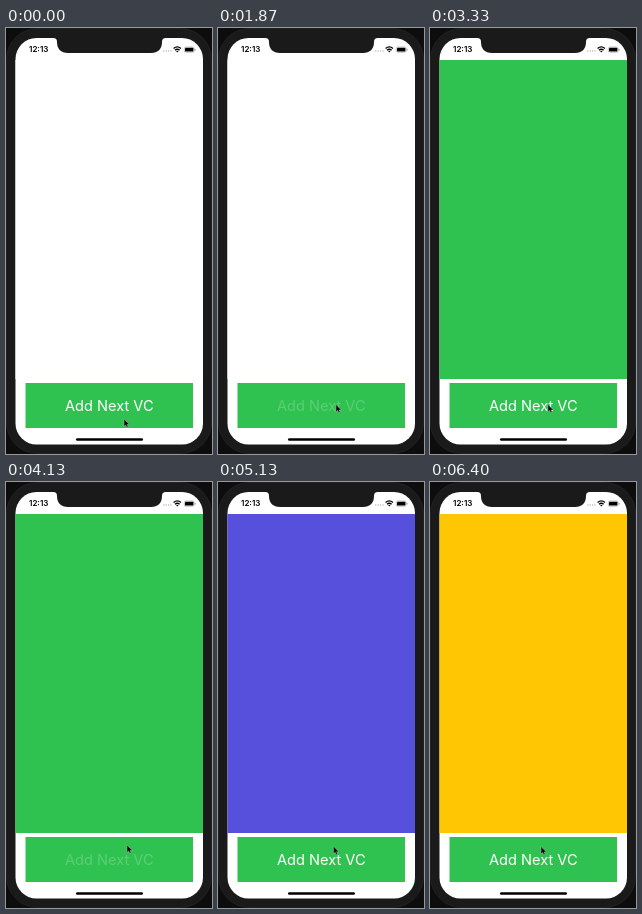
Recreate the animation shown at these times as an HTML page. Size 206 by 426 pixels, loop 7.67 s.

```html
<!DOCTYPE html>
<html lang="en">
<head>
<meta charset="utf-8">
<title>Add Next VC</title>
<style>
  html, body { margin: 0; width: 100%; height: 100%; overflow: hidden; background: #0d0d0e; }
  svg { display: block; width: 100%; height: 100%; }
  text { font-family: Inter, "Liberation Sans", sans-serif; }
</style>
</head>
<body>
<svg viewBox="0 0 206 426">
  <rect x="0.5" y="0.5" width="205" height="425" rx="31" fill="#1a1a1b" stroke="#272728" stroke-width="0.7"/>
  <rect x="9.5" y="10" width="187.5" height="406.5" rx="21" fill="#fff"/>
  <path d="M47 9.5V10C50 10 51 11.500 51 14C51 21 55 25 62 25H145C152 25 156 21 156 14C156 11.500 157 10 160 10V9.500Z" fill="#1a1a1b"/>

  <text x="23" y="24.300" font-size="8" font-weight="600">12:13</text>
  <g fill="#b5b5b5">
    <circle cx="157.800" cy="23" r="0.700"/><circle cx="160.200" cy="23" r="0.700"/>
    <circle cx="162.600" cy="23" r="0.700"/><circle cx="165" cy="23" r="0.700"/>
  </g>
  <g fill="none" stroke="#000" stroke-width="1.300">
    <path d="M167.600 20.500Q171.300 17.200 175 20.500M169 22.200Q171.300 20.200 173.600 22.200"/>
    <path d="M171.300 24.600L170.100 23.300Q171.300 22.400 172.500 23.300Z" fill="#000" stroke="none"/>
  </g>
  <rect x="178.300" y="19" width="9.800" height="5.300" rx="1.500" fill="none" stroke="#888" stroke-width="0.500"/>
  <rect x="179" y="19.700" width="8.400" height="3.900" rx="0.900"/>
  <rect x="188.700" y="20.700" width="0.800" height="2" rx="0.400" fill="#888"/>

  <rect id="panel" x="9.500" y="32" width="187.500" height="319"/>
  <rect x="19.500" y="355" width="167.500" height="45" fill="#30c250"/>
  <text id="label" x="103.300" y="383.300" font-size="14.600" text-anchor="middle" fill="#fff">Add Next VC</text>
  <rect x="70" y="410.300" width="67" height="2.400" rx="1.200"/>
  <path id="cursor" d="M0 0V7.500L1.700 6L2.800 8.300L4.100 7.700L3.100 5.500H5.300Z" fill="#0a0a0a" stroke="#bbb" stroke-width="0.450"/>
</svg>
<script>
const LOOP = 7670;
const DIM = 0.2;
const [panel, label, cursor] = ["panel", "label", "cursor"].map(id => document.getElementById(id));

// Each tap: finger down, new panel shown, label restored.
const taps = [
  { down: 1870, show: 1930, end: 2470, color: "#30c250" },
  { down: 4130, show: 4270, end: 4730, color: "#5650dc" },
  { down: 5870, show: 5930, end: 6400, color: "#ffc604" }
];

// Pointer tip: time, x, y
const path = [
  [0, 118, 391], [530, 123, 424], [740, 123, 424],
  [1200, 118, 388], [1530, 118, 376.5], [3300, 118, 376.5],
  [4000, 121, 363], [4800, 121, 363], [5130, 115.5, 364.3],
  [5330, 111.5, 364.5], [5470, 111, 364.5], [LOOP, 111, 364.5]
];

const clamp = v => Math.max(0, Math.min(1, v));
const mix = (a, b, k) => a + (b - a) * k;
const smooth = k => k * k * (3 - 2 * k);

function pointerAt(t) {
  const i = path.findIndex(p => p[0] > t);
  const [a, b] = [path[i - 1], path[i]];
  const k = smooth((t - a[0]) / (b[0] - a[0]));
  return [mix(a[1], b[1], k), mix(a[2], b[2], k)];
}

function render(t) {
  let color = "#fff", alpha = 1;
  for (const tap of taps) {
    if (t >= tap.down) alpha = mix(DIM, 1, smooth(clamp((t - tap.show) / (tap.end - tap.show))));
    if (t >= tap.show) color = tap.color;
  }
  panel.setAttribute("fill", color);
  label.setAttribute("opacity", alpha);
  cursor.setAttribute("transform", `translate(${pointerAt(t)})`);
}

const start = performance.now();
function tick() {
  render((performance.now() - start) % LOOP);
  requestAnimationFrame(tick);
}
tick();
</script>
</body>
</html>
```
